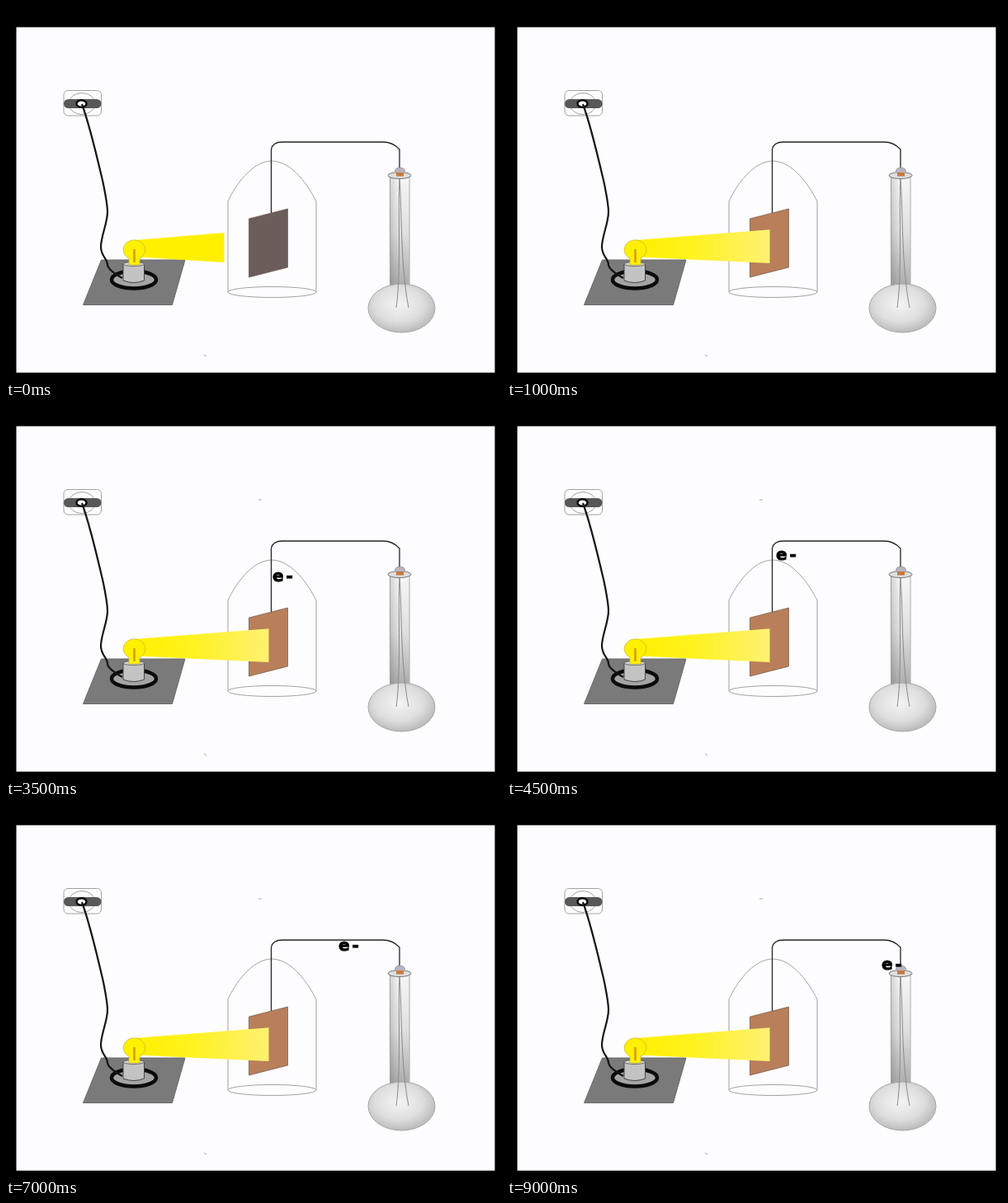
These frames come from a looping animation (600 px wide and 450 px high, 9100 ms). An HTML page:

```html
<!DOCTYPE html>
<html lang="en">
<head>
<meta charset="utf-8">
<title>Photoelectric effect</title>
<style>
html, body { margin: 0; width: 100%; height: 100%; overflow: hidden; background: #000; }
svg { display: block; width: 600px; height: 450px; }
.thin { fill: none; stroke: #a2a2a2; stroke-width: 1; }
.beam, .speck, .electron { animation: 9100ms step-end infinite; }
.short { animation-name: short; }
.long { animation-name: long; }
.speck { animation-name: speck; }
.plate { animation: heat 9100ms linear infinite; }
.electron {
  animation-name: travel;
  font: bold 20px "DejaVu Sans", sans-serif;
  letter-spacing: 3px;
  stroke: #000;
  stroke-width: .9;
}
@keyframes short { 0% { opacity: 1 } 5.49%, 100% { opacity: 0 } }
@keyframes long { 0% { opacity: 0 } 5.49%, 100% { opacity: 1 } }
@keyframes speck { 0% { opacity: 0 } 16.48%, 100% { opacity: 1 } }
@keyframes heat { 0%, 5.49% { fill: #6b5d5a } 10.98%, 100% { fill: #b97f5b } }
@keyframes travel {
  0% { opacity: 0; transform: translate(294px, 238px) }
  20.87% { opacity: 1; transform: translate(294px, 238px) }
  26.92% { transform: translate(302px, 230px) }
  31.86% { transform: translate(309px, 218px) }
  37.36% { transform: translate(323px, 208px) }
  43.95% { transform: translate(325px, 197px) }
  48.9% { transform: translate(326px, 182px) }
  53.29% { transform: translate(330px, 172px) }
  59.89% { transform: translate(346px, 172px) }
  65.93% { transform: translate(361px, 172px) }
  71.42% { transform: translate(386px, 172px) }
  75.82% { transform: translate(403px, 172px) }
  82.41% { transform: translate(421px, 172px) }
  86.26% { transform: translate(444px, 173px) }
  93.4% { transform: translate(454px, 184px) }
  98.9%, 100% { opacity: 1; transform: translate(454px, 195px) }
}
</style>
</head>
<body>
<svg viewBox="0 0 600 450">
  <defs>
    <linearGradient id="light">
      <stop offset="0" stop-color="#fff000"/>
      <stop offset=".4" stop-color="#fff21c"/>
      <stop offset="1" stop-color="#fff173"/>
    </linearGradient>
    <linearGradient id="tube" x2="0" y2="1">
      <stop offset="0" stop-color="#f4f4f4"/>
      <stop offset=".5" stop-color="#d8d8d8"/>
      <stop offset="1" stop-color="#929292"/>
    </linearGradient>
    <linearGradient id="shine">
      <stop offset="0" stop-color="#888" stop-opacity=".3"/>
      <stop offset=".5" stop-color="#fff" stop-opacity=".2"/>
      <stop offset="1" stop-color="#fff" stop-opacity=".2"/>
    </linearGradient>
    <radialGradient id="flask" cx=".46" cy=".42" r=".6">
      <stop offset="0" stop-color="#f4f4f4"/>
      <stop offset=".6" stop-color="#dedede"/>
      <stop offset="1" stop-color="#b8b8b8"/>
    </radialGradient>
  </defs>

  <rect width="600" height="450"/>
  <rect x="12.500" y="25.700" width="580" height="419" fill="#fdfcfe"/>
  <path d="M240 423l3 2" stroke="#aaa"/>
  <path class="speck" d="M306 115h4" stroke="#aaa"/>

  <!-- wall socket -->
  <rect class="thin" x="70" y="102.500" width="45.500" height="30.500" rx="5"/>
  <ellipse class="thin" cx="92" cy="118.500" rx="16" ry="13"/>
  <rect x="70" y="113" width="45.500" height="11" rx="5.500" fill="#585858"/>
  <ellipse cx="91.500" cy="118.500" rx="6" ry="4.300" fill="#fff" stroke="#080808" stroke-width="2.400"/>

  <!-- lamp base -->
  <path d="M115.500 308H217L201.500 362.500H93.500Z" fill="#7a7a7a" stroke="#6a6a6a"/>
  <ellipse cx="155" cy="332" rx="27" ry="10.500" fill="#a4a4a4" stroke="#0a0a0a" stroke-width="4.500"/>
  <path d="M92 119C102 146 111 186 118 216C121 231 123 241 123 250C123 263 115 280 115 292C115 304 123 306 123 314C124 320 132 325 141 330" fill="none" stroke="#151515" stroke-width="2.200"/>

  <!-- glass dome -->
  <path class="thin" d="M269 347V237C277 219 298 188 322 188C347 188 367 219 376 237V347"/>
  <ellipse class="thin" cx="322.500" cy="347" rx="53.500" ry="6.500"/>

  <path d="M321.500 251V174Q323 165 335 165H457Q469 165 477 174V198" fill="none" stroke="#262626" stroke-width="1.300"/>
  <path class="plate" d="M294.500 258L341.500 246V317L294.500 329Z" stroke="#6e5546" stroke-width=".7"/>

  <path class="beam short" d="M156 284L264.500 275V311L160 304.500Z" fill="#fff000"/>
  <path class="beam long" d="M156 284L318.500 271.200V312L160 304.500Z" fill="url(#light)"/>

  <!-- lamp -->
  <path d="M142 313V333Q155 338 167.500 333V313" fill="#c3c3c3" stroke="#444"/>
  <ellipse cx="154.800" cy="313" rx="12.800" ry="2.500" fill="#d3d3d3" stroke="#555" stroke-width=".8"/>
  <path d="M149 314V306A13.300 11.800 0 1 1 162 306V314Z" fill="#fff000" stroke="#c9b92c" stroke-width=".8"/>
  <path d="M155.500 311V295" stroke="#d99a1a" stroke-width="2.600"/>

  <!-- electroscope -->
  <path d="M465.500 205H489V345H465.500Z" fill="url(#tube)" stroke="#a2a2a2"/>
  <path d="M465.500 205H489V345H465.500Z" fill="url(#shine)"/>
  <ellipse cx="479.500" cy="366.500" rx="40.500" ry="29.500" fill="url(#flask)" stroke="#a6a6a6"/>
  <path d="M477 208C475 250 479 325 473 366M477 208C480 250 478 315 488 366" fill="none" stroke="#8a8a8a"/>
  <ellipse cx="477" cy="205.500" rx="14" ry="4" fill="#dedede" stroke="#777"/>
  <ellipse cx="477.500" cy="200" rx="6" ry="4" fill="#b9b4c0" stroke="#888" stroke-width=".7"/>
  <rect x="473" y="202" width="9" height="4.500" fill="#c77a3e"/>

  <text class="electron" x="0" y="6">e-</text>
</svg>
</body>
</html>
```
